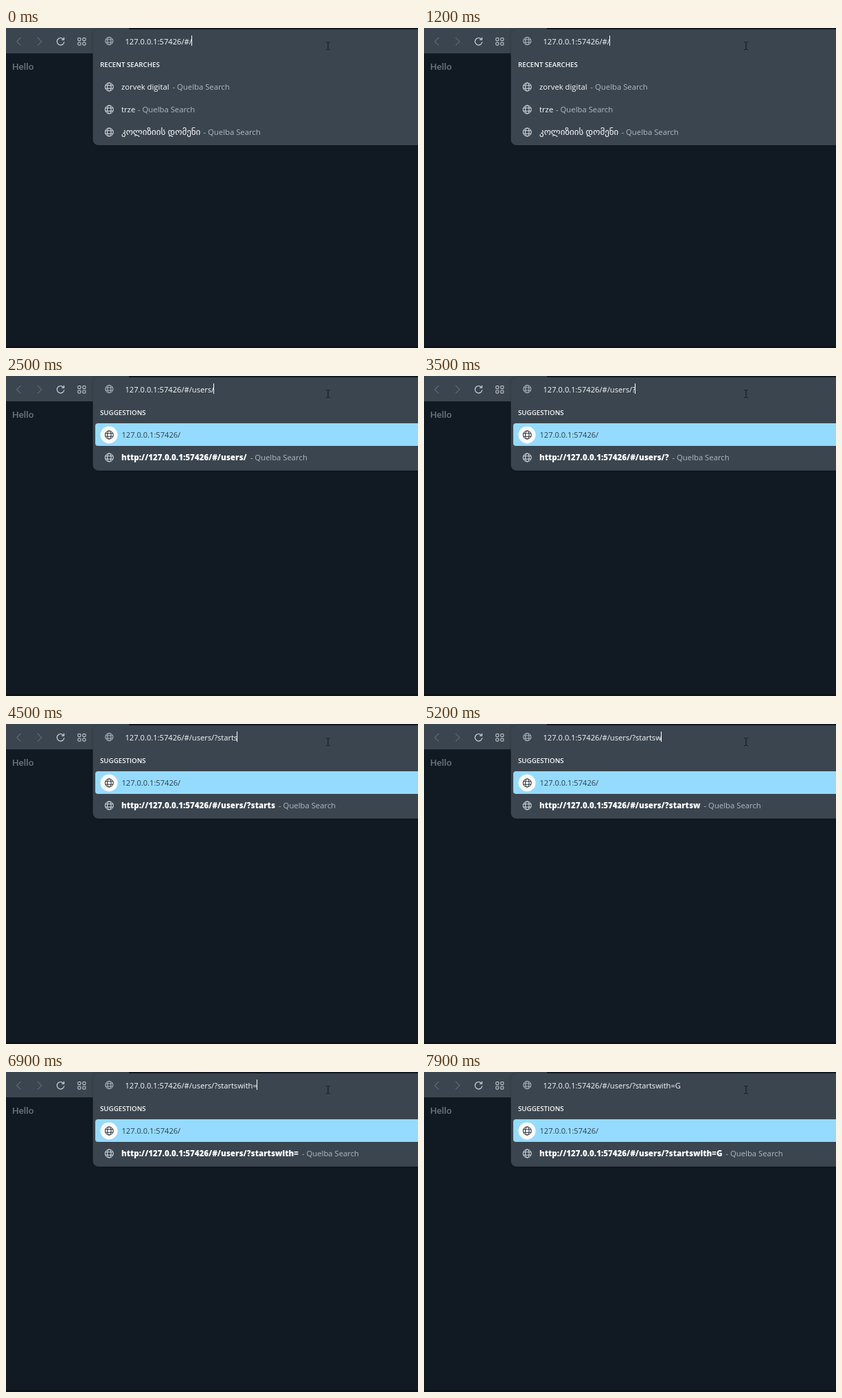
Recreate the animation shown at these times as an HTML page with a canvas. Size 600 by 467 pixels, loop 8 s.

```html
<!DOCTYPE html>
<html lang="en">
<head>
<meta charset="utf-8">
<title>Address bar typing</title>
<style>
html, body { margin: 0; width: 100%; height: 100%; overflow: hidden; background: #111923; }
canvas { display: block; width: 600px; height: 467px; }
</style>
</head>
<body>
<canvas id="stage" width="600" height="467"></canvas>
<script>
const ctx = document.getElementById('stage').getContext('2d');
const LOOP = 8000;
const SANS = '"Open Sans", "Noto Sans", "DejaVu Sans", sans-serif';
const BASE = '127.0.0.1:57426/#/';
const SUFFIX = '- Quelba Search';
const C = { page: '#111923', bar: '#3b454f', text: '#fafcfd', icon: '#d3d9de', soft: '#b2bac2', dim: '#626c76' };

// Each key press: [time in ms, character]
const KEYS = [
  [1400, 'u'], [1500, 's'], [1700, 'e'], [1900, 'r'], [2100, 's'], [2400, '/'], [3100, '?'],
  [3700, 's'], [3800, 't'], [4000, 'a'], [4100, 'r'], [4200, 't'], [4400, 's'],
  [5000, 'w'], [5300, 'i'], [5500, 't'], [5700, 'h'], [6600, '='], [7000, 'G']
];

function text(str, x, y, color, size, weight = 400, family = SANS) {
  ctx.font = `${weight} ${size}px ${family}`;
  ctx.fillStyle = color;
  ctx.fillText(str, x, y);
  return x + ctx.measureText(str).width;
}

function box(x, y, w, h, radii, color) {
  ctx.fillStyle = color;
  ctx.beginPath();
  ctx.roundRect(x, y, w, h, radii);
  ctx.fill();
}

function line(points, color, width = 1.1) {
  ctx.strokeStyle = color;
  ctx.lineWidth = width;
  ctx.beginPath();
  points.forEach(([x, y]) => ctx.lineTo(x, y));
  ctx.stroke();
}

function globe(x, y, r, color) {
  ctx.strokeStyle = color;
  ctx.lineWidth = 1;
  ctx.beginPath();
  ctx.arc(x, y, r, 0, 7);
  ctx.moveTo(x + r * 0.46, y);
  ctx.ellipse(x, y, r * 0.46, r, 0, 0, 7);
  for (const dy of [-0.36, 0.36]) {
    ctx.moveTo(x - r * 0.93, y + r * dy);
    ctx.lineTo(x + r * 0.93, y + r * dy);
  }
  ctx.stroke();
}

function toolbar() {
  box(0, 0, 600, 37, 0, C.bar);
  box(179, 0, 421, 2, 0, C.page);
  line([[21.5, 14], [15.5, 19.7], [21.5, 25.4]], C.dim);
  line([[46, 14], [52, 19.7], [46, 25.4]], C.dim);

  ctx.strokeStyle = C.icon;
  ctx.lineWidth = 1.2;
  ctx.beginPath();
  ctx.arc(79.5, 19.7, 5.2, 0.1, 5.5);
  ctx.stroke();
  line([[84.4, 13.8], [84.4, 17.1], [81, 17.1]], C.icon, 1.2);

  ctx.lineWidth = 1;
  for (const x of [104.8, 111.8]) {
    for (const y of [14.5, 21]) {
      ctx.beginPath();
      ctx.roundRect(x, y, 4, 4, 0.5);
      ctx.stroke();
    }
  }
}

function recent() {
  text('RECENT SEARCHES', 137, 56.7, C.text, 9.75, 600);
  const rows = [['zorvek digital', 242.5], ['trze', 192], ['კოლიზიის დომენი', 287.5]];
  rows.forEach(([name, x], i) => {
    const y = 86 + 33 * i;
    globe(150.3, y, 6, '#dce2e7');
    text(name, 168, y + 4.2, C.text, i === 2 ? 13 : 11.3, 500);
    text(SUFFIX, x, y + 4.2, C.soft, 11.3);
  });
}

function suggestions(url) {
  text('SUGGESTIONS', 137, 56.7, C.text, 9.75, 600);
  box(130, 69, 470, 33, [4, 0, 0, 4], '#95dbff');
  box(137.5, 73.5, 25, 25, 12.5, '#fff');
  globe(150.3, 86, 6, '#20262c');
  text('127.0.0.1:57426/', 168.5, 90.2, '#2c3c49', 11.1);
  globe(150.3, 119, 6, '#dce2e7');
  const end = text('http://' + url, 168, 123.2, '#fff', 11.55, 800);
  text(SUFFIX, end + 5, 123.2, C.soft, 11.3);
}

function draw(now) {
  const t = Math.floor((now % LOOP) / 100) * 100;
  const pressed = KEYS.filter(([time]) => time <= t);
  const typing = pressed.length > 0;
  const url = BASE + pressed.map(key => key[1]).join('');
  const caret = typing
    ? (t - pressed[pressed.length - 1][0]) % 1060 < 530
    : t < 600 || t >= 1100;

  box(0, 0, 600, 467, 0, C.page);
  box(0, 464, 600, 3, 0, '#0c131b');
  text('Hello', 9, 60.5, '#69727a', 13.5, 500, 'Roboto, sans-serif');
  toolbar();

  ctx.shadowColor = 'rgba(0, 0, 0, 0.25)';
  ctx.shadowBlur = 3;
  box(126.5, 2, 480, typing ? 136 : 169, [8, 0, 0, 8], C.bar);
  ctx.shadowBlur = 0;
  ctx.shadowColor = 'transparent';

  globe(150.3, 19, 5.6, '#b3bcc4');
  const end = text(url, 173.5, 24, C.text, 11.15, 500);
  if (caret) box(Math.round(end) - 1, 11, 1, 15, 0, '#fff');

  if (typing) suggestions(url);
  else recent();

  line([[466, 20.5], [468, 20.5], [469, 21.5], [470, 20.5], [472, 20.5]], '#161c22', 1);
  line([[469, 21], [469, 31]], '#161c22', 1.2);
  line([[466, 31.5], [468, 31.5], [469, 30.5], [470, 31.5], [472, 31.5]], '#161c22', 1);
}

let start;
function tick(now) {
  start ??= now;
  draw(now - start);
  requestAnimationFrame(tick);
}
requestAnimationFrame(tick);
</script>
</body>
</html>
```
